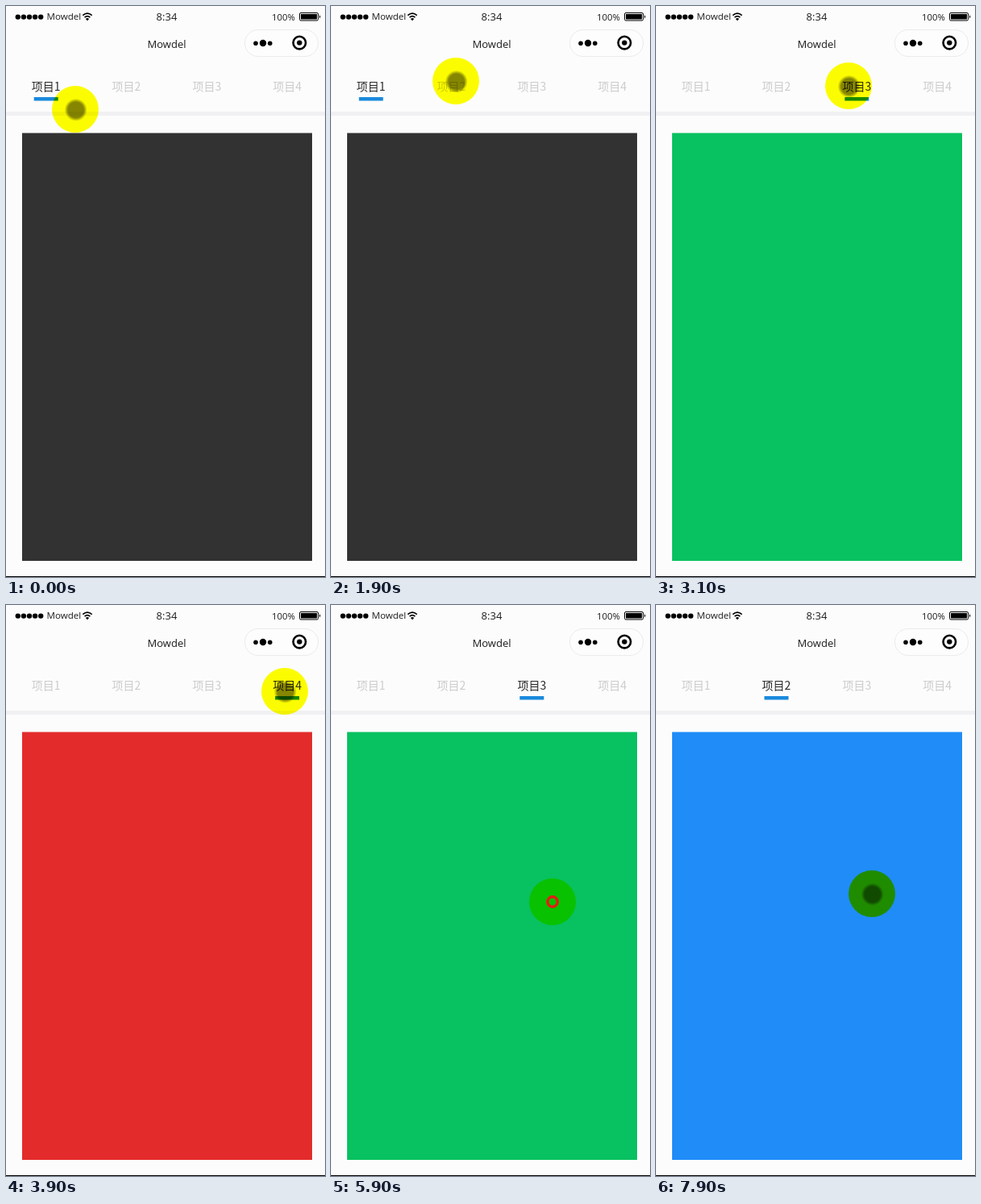
These frames come from a looping animation (396 px wide and 708 px high, 8000 ms). An HTML page:

```html
<!DOCTYPE html>
<html lang="zh-CN">
<head>
<meta charset="utf-8">
<title>Tabs</title>
<style>
  html, body { margin: 0; width: 100%; height: 100%; overflow: hidden; background: #fcfcfc; }
  svg { display: block; width: 396px; height: 708px; }
  text { font-family: "Open Sans", "Noto Sans", sans-serif; fill: #1c1c1c; }
  .tab { font: 14px "Noto Sans CJK SC", "Noto Sans CJK", sans-serif; text-anchor: middle; }
  #halo { mix-blend-mode: multiply; }
</style>
</head>
<body>
<svg viewBox="0 0 396 708" xmlns="http://www.w3.org/2000/svg">
  <defs>
    <radialGradient id="touch">
      <stop offset="0.7" stop-color="#000" stop-opacity="0.47"/>
      <stop offset="1" stop-color="#000" stop-opacity="0"/>
    </radialGradient>
  </defs>
  <rect width="396" height="708" fill="#fcfcfc"/>

  <!-- status bar -->
  <g id="signal"></g>
  <text x="50.5" y="17" font-size="11.6">Mowdel</text>
  <g fill="none" stroke="#000" stroke-width="1.7">
    <path d="M95.3 11.6Q101 6.8 106.7 11.6"/>
    <path d="M97.6 14.2Q101 11.2 104.4 14.2"/>
  </g>
  <path d="M98.9 15.9Q101 14.2 103.1 15.9L101 18.2Z"/>
  <text x="199.5" y="17.8" font-size="13" text-anchor="middle">8:34</text>
  <text x="330" y="17.6" font-size="11.3">100%</text>
  <rect x="364.5" y="8.5" width="23" height="9.5" rx="1.5" fill="none" stroke="#000"/>
  <rect x="366" y="10" width="20" height="6.5"/>
  <path d="M389 11.2q2.6 2 0 4z"/>

  <!-- title bar -->
  <text x="199.5" y="52.3" font-size="13" text-anchor="middle">Mowdel</text>
  <rect x="296.5" y="29.5" width="91" height="33" rx="16.5" fill="#fdfdfd" stroke="#ebebeb"/>
  <circle cx="310" cy="46.3" r="2.8"/>
  <circle cx="319" cy="46" r="4.2"/>
  <circle cx="327.7" cy="46.3" r="2.8"/>
  <circle cx="364.3" cy="45.6" r="7.8" fill="none" stroke="#000" stroke-width="2.6"/>
  <circle cx="364.3" cy="45.6" r="3.2"/>

  <g id="tabs"></g>
  <rect id="line" y="113" width="30" height="4.5" fill="#1989dc"/>
  <rect y="131" width="396" height="5" fill="#f1f1f4"/>
  <rect id="panel" x="20" y="157.5" width="360" height="530.5"/>
  <rect y="707" width="396" height="1" fill="#000"/>

  <circle id="dot" r="14" fill="url(#touch)"/>
  <circle id="halo" r="29" fill="#ff0"/>
  <circle id="ring" r="6.2" fill="none" stroke="#e41c14" stroke-width="3.4"/>
  <circle id="flash" r="28" fill="#0abb8c"/>
</svg>
<script>
const LOOP = 8000, STEP = 100, FLASH = 5200;
const colours = ['#323232', '#1f8cf8', '#08c160', '#e32b2b'];
const $ = id => document.getElementById(id);
const tabX = i => 49.7 + 99.8 * i;

// Pointer moves; a tab opens one step after its move ends.
const moves = [
  { from: 0, to: 300, x: 80, y: 129 },
  { from: 700, to: 1500, x: 146, y: 92 },
  { from: 1600, to: 1900, x: 155, y: 93, opens: 1 },
  { from: 2300, to: 2900, x: 239, y: 99, opens: 2 },
  { from: 3300, to: 3700, x: 346, y: 107, opens: 3 },
  { from: 4200, to: 4600, x: 241, y: 93, opens: 2 },
  { from: 5000, to: 5200, x: 241, y: 243 },
  { from: 5200, to: 5500, x: 143, y: 362 },
  { from: 5500, to: 5900, x: 275, y: 368, opens: 1, drag: true },
  { from: 6400, to: 6600, x: 285, y: 357 },
  { from: 6600, to: 6900, x: 156, y: 357, opens: 2, drag: true },
  { from: 7500, to: 7800, x: 268, y: 358, opens: 1, drag: true }
];

function add(parent, tag, attrs, text) {
  const el = document.createElementNS('http://www.w3.org/2000/svg', tag);
  for (const k in attrs) el.setAttribute(k, attrs[k]);
  if (text) el.textContent = text;
  return parent.appendChild(el);
}

function put(id, x, y, on) {
  const el = $(id);
  el.setAttribute('cx', x);
  el.setAttribute('cy', y);
  el.setAttribute('visibility', on ? 'visible' : 'hidden');
}

const ease = p => p * p * (3 - 2 * p);

function stateAt(t) {
  const s = { x: 86, y: 128, tab: 0, held: false };
  for (const m of moves) {
    if (t < m.from) break;
    const p = Math.min(1, (t - m.from) / (m.to - m.from));
    const k = m.drag ? p : ease(p);
    const done = t >= m.to + STEP;
    s.x += (m.x - s.x) * k;
    s.y += (m.y - s.y) * k;
    s.held = Boolean(m.drag) && !done;
    if (done && m.opens !== undefined) s.tab = m.opens;
  }
  return s;
}

for (let i = 0; i < 5; i++) add($('signal'), 'circle', { cx: 14.8 + 7.1 * i, cy: 13.6, r: 3.2 });
const tabs = colours.map((_, i) => add($('tabs'), 'text', { x: tabX(i), y: 105, class: 'tab' }, '项目' + (i + 1)));

function draw(t) {
  const { x, y, tab, held } = stateAt(t);
  const flash = t === FLASH;
  tabs.forEach((el, i) => { el.style.fill = i === tab ? '#2b2b2b' : '#cccccc'; });
  $('line').setAttribute('x', tabX(tab) - 15);
  $('panel').setAttribute('fill', colours[tab]);
  put('halo', x, y, !flash);
  put('dot', x + 0.7, y + 0.8, !flash && !held);
  put('ring', x, y, held);
  put('flash', x, y, flash);
}

const start = performance.now();
function frame() {
  const t = (performance.now() - start) % LOOP;
  draw(Math.floor(t / STEP) * STEP);
  requestAnimationFrame(frame);
}
frame();
</script>
</body>
</html>
```
